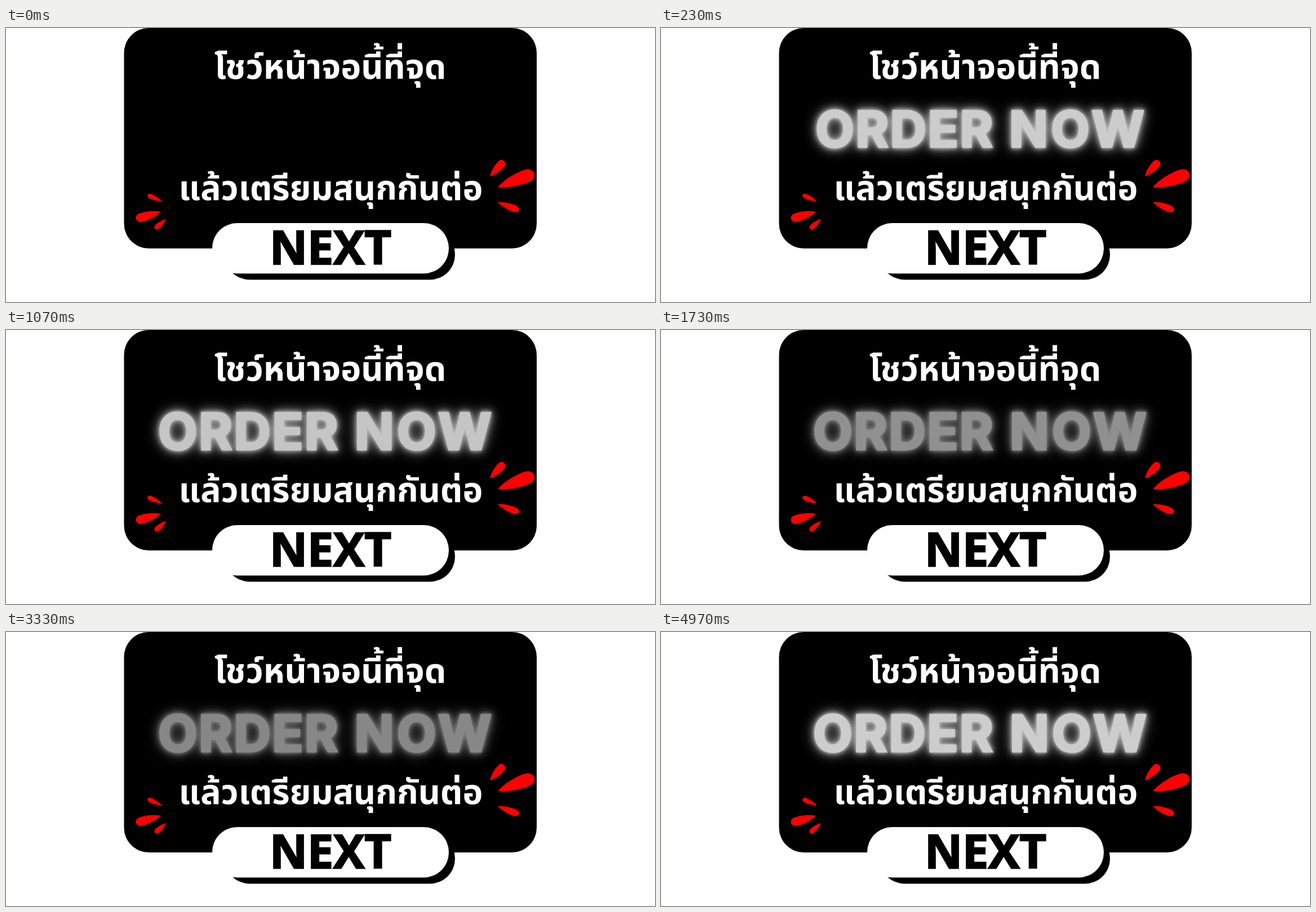
An HTML page for the animation above (5.01 s loop, 1152x486 px).

```html
<!DOCTYPE html>
<html lang="th">
<head>
<meta charset="utf-8">
<title>Order now</title>
<style>
  html, body { margin: 0; width: 100%; height: 100%; overflow: hidden; background: #fff; }
  svg { display: block; width: 100%; height: 100%; }
  text { text-anchor: middle; font-weight: 700; }
  .thai { font-family: "Noto Sans Thai", "Noto Sans", sans-serif; font-size: 61px; fill: #fff; }
  .next { font-family: "Noto Sans", "Open Sans", sans-serif; font-size: 82.5px; stroke: #000; stroke-width: 2.5px; }
  .neon text {
    font-family: Inter, sans-serif; font-size: 92px; font-weight: 800;
    fill: #eee; stroke: #eee; stroke-width: 1.5px;
  }
  .neon {
    filter: drop-shadow(0 0 3px rgba(255, 255, 255, .8))
            drop-shadow(0 0 7px rgba(255, 255, 255, .65))
            drop-shadow(0 0 12px rgba(255, 255, 255, .4));
    animation: pulse 5010ms cubic-bezier(.37, 0, .63, 1) infinite;
  }
  .stomp { transform-origin: 565.5px 179.5px; animation: stomp 5010ms linear infinite; }

  @keyframes stomp {
    0%, .2% { transform: scale(2.2); opacity: 0; animation-timing-function: ease-in; }
    2.4% { opacity: 1; }
    3.3% { transform: scale(.965); animation-timing-function: ease-out; }
    6.4%, 100% { transform: scale(1); opacity: 1; }
  }
  /* Bright peaks separated by 200 ms dim rests */
  @keyframes pulse {
    0%, .3%, 25.95%, 51.5%, 77.15% { opacity: 1; }
    11.38%, 15.37%, 36.53%, 40.52%, 62.48%, 66.47%, 87.82% { opacity: .57; }
    92.42% { opacity: .57; animation-timing-function: cubic-bezier(.45, 0, .8, .8); }
    100% { opacity: .91; }
  }
</style>
</head>
<body>
<svg viewBox="0 0 1152 486" preserveAspectRatio="none">
  <defs>
    <path id="drop" d="M0 0C25-16 60-22 82-20C106-17 106 17 82 20C60 22 25 16 0 0Z"/>
    <clipPath id="card"><rect x="209.5" width="732.5" height="391" rx="44"/></clipPath>
  </defs>

  <rect x="209.5" width="732.5" height="391" rx="44"/>
  <text class="thai" x="575.5" y="90" data-span="411.5">โชว์หน้าจอนี้ที่จุด</text>
  <text class="thai" x="576.5" y="305" data-span="540">แล้วเตรียมสนุกกันต่อ</text>

  <g fill="#f00">
    <use href="#drop" transform="translate(859 263) rotate(-47) scale(.37 .35)"/>
    <use href="#drop" transform="translate(873 282) rotate(-21) scale(.69 .57)"/>
    <use href="#drop" transform="translate(873 309) rotate(21) scale(.4 .3)"/>
    <use href="#drop" transform="translate(276 307) rotate(204) scale(.27 .2)"/>
    <use href="#drop" transform="translate(275 326) rotate(164) scale(.46 .38)"/>
    <use href="#drop" transform="translate(284 339) rotate(139) scale(.26 .22)"/>
  </g>

  <g clip-path="url(#card)">
    <g class="stomp">
      <g class="neon">
        <text x="430.5" y="212.5" letter-spacing="1.4">ORDER</text>
        <text x="743" y="212.5" letter-spacing="4.5">NOW</text>
      </g>
    </g>
  </g>

  <rect x="388" y="357" width="409" height="89.5" rx="44.5"/>
  <rect x="366" y="346" width="420" height="89.5" rx="44.5" fill="#fff"/>
  <text class="next" x="576" y="419">NEXT</text>
</svg>
<script>
  // Choose the type size that gives each line its span
  for (const line of document.querySelectorAll('.thai')) {
    const size = 61 * line.dataset.span / line.getComputedTextLength();
    line.style.fontSize = Math.min(68, Math.max(50, size)) + 'px';
  }
</script>
</body>
</html>
```
